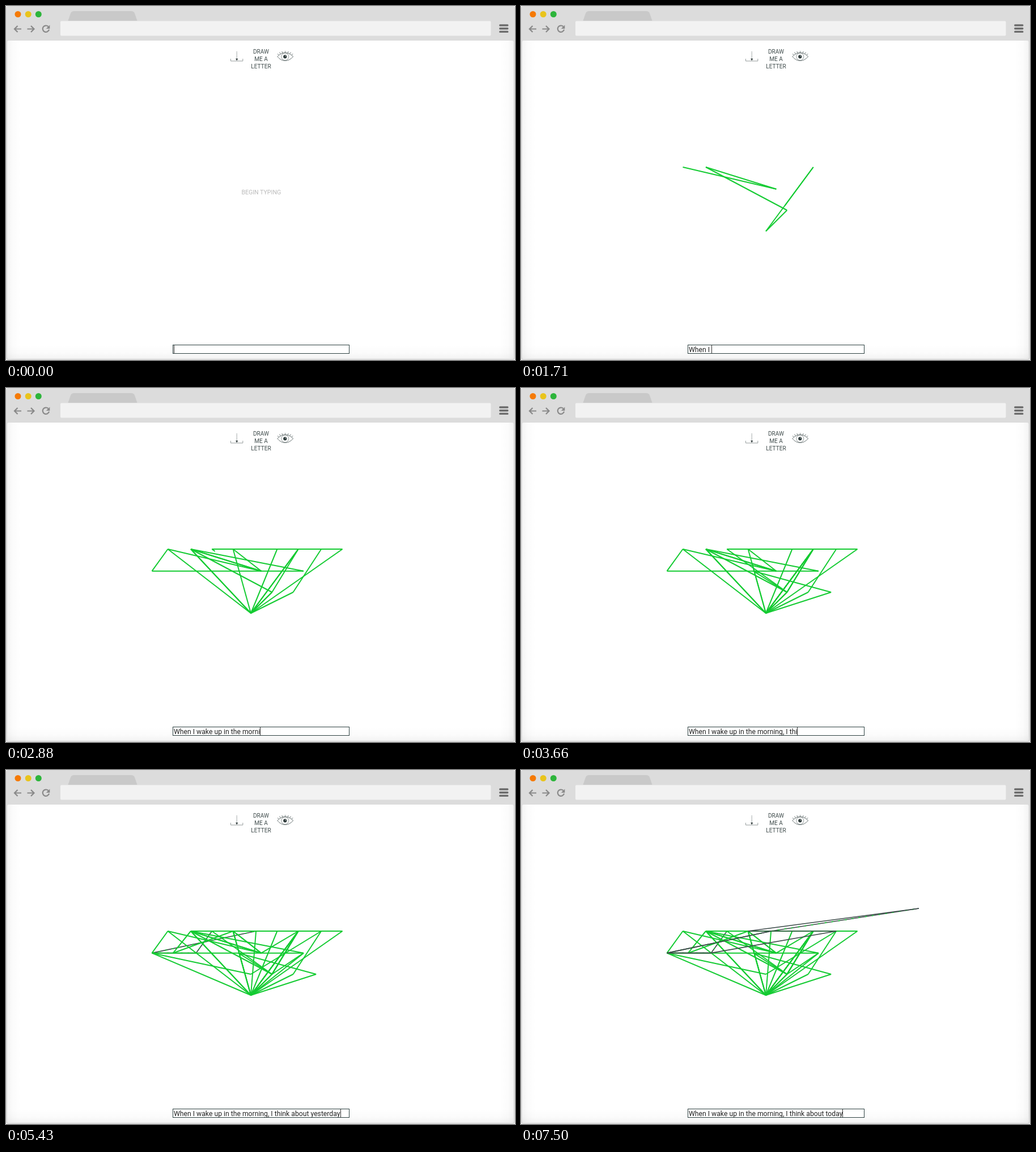
An HTML page with a canvas for the animation above (7.71 s loop, 898 by 624 pixels).

```html
<!DOCTYPE html>
<html lang="en">
<head>
<meta charset="utf-8">
<title>Draw me a letter</title>
<style>
  html, body { margin: 0; width: 100%; height: 100%; overflow: hidden; background: #fff; }
  svg, canvas { position: absolute; left: 0; top: 0; }
  text { font-family: Roboto, sans-serif; text-anchor: middle; }
  .title { font-size: 10.1px; fill: #414d4d; }
  .hint { font-size: 10.6px; fill: #bababa; animation: vanish 7710ms linear infinite; }
  @keyframes vanish { 0%, .4% { opacity: 1; } 3.5%, 100% { opacity: 0; } }
  .field {
    position: absolute; left: 294px; top: 597px; width: 310px; height: 14px;
    border: 1px solid #2e4141; background: #fff; overflow: hidden;
    font: 12.2px/16px Roboto, sans-serif; color: #222; white-space: pre;
  }
  .typed { position: absolute; left: 1px; top: 0; display: flex; height: 14px; }
  #caret { width: 1px; background: #333; }
</style>
</head>
<body>
<svg width="898" height="624" viewBox="0 0 898 624">
  <defs>
    <linearGradient id="side">
      <stop offset="0" stop-opacity=".045"/>
      <stop offset=".4" stop-opacity=".015"/>
      <stop offset="1" stop-opacity="0"/>
    </linearGradient>
    <linearGradient id="foot" href="#side" x1="0" y1="1" x2="0" y2="0"/>
  </defs>

  <!-- browser window -->
  <rect width="898" height="624" rx="4" fill="#dcdcdc"/>
  <rect x="2" y="61" width="893.5" height="560.5" rx="2" fill="#fff"/>
  <rect x="2" y="61" width="24" height="560" fill="url(#side)"/>
  <rect x="2" y="61" width="24" height="560" fill="url(#side)" transform="matrix(-1 0 0 1 897.5 0)"/>
  <rect x="2" y="597" width="893" height="24" fill="url(#foot)"/>
  <circle cx="21" cy="14.5" r="5.5" fill="#f57a05"/>
  <circle cx="39.2" cy="14.5" r="5.5" fill="#e9c41c"/>
  <circle cx="57.3" cy="14.5" r="5.5" fill="#2db53b"/>
  <path d="M109.500 26L114 13Q115.500 9 120 9H221Q225.500 9 227 13L231.500 26Z" fill="#c9c9c9"/>
  <rect x="96" y="26.500" width="759.500" height="26" rx="2" fill="#f2f2f2"/>
  <g fill="none" stroke="#898989" stroke-width="2.2">
    <path d="M27 40.500H15.500M20.500 35L15 40.500L20.500 46"/>
    <path d="M37.500 40.500H49M44 35L49.500 40.500L44 46"/>
    <path d="M74.500 36.200A5.700 5.700 0 1 0 76 41.500"/>
  </g>
  <path d="M77.300 33.500V40H70.800Z" fill="#898989"/>
  <path d="M871.700 34H884.800M871.700 39.700H884.800M871.700 45.400H884.800" stroke="#6c6c6c" stroke-width="3.4" stroke-linecap="round"/>

  <!-- page header -->
  <g class="title">
    <text x="450" y="84.300">DRAW</text>
    <text x="450" y="97.300">ME A</text>
    <text x="450" y="110.300">LETTER</text>
  </g>
  <g fill="none" stroke="#4a5656" stroke-width=".8">
    <path d="M396.500 93V97H417.800V93" stroke="#7b8484"/>
    <path d="M407.200 80.500V93" stroke-dasharray="1.6 1"/>
    <path d="M405.600 93H408.800L407.200 96Z" fill="#222"/>
    <path d="M478.800 89.200Q485 82.500 492.500 82.500T506.700 89.200Q500 96.500 492.500 96.500T478.800 89.200Z"/>
    <circle cx="492.300" cy="89.300" r="6.500" stroke-width=".6"/>
    <path d="M481.500 86.500L479 84.300M484.500 84.500L482.500 81.500M488 83L486.800 80M492.500 82.500V79.300M497 83L498.200 80M500.500 84.500L502.500 81.500M503.800 86.500L506.300 84.300"/>
    <circle cx="492.300" cy="89.300" r="2.900" fill="#2c3838"/>
  </g>
  <circle cx="493.200" cy="88.300" r=".7" fill="#fff"/>
  <text class="hint" x="450.300" y="332">BEGIN TYPING</text>
</svg>
<canvas id="art" width="898" height="624"></canvas>
<div class="field"><div class="typed"><span id="words"></span><span id="caret"></span></div></div>

<script>
const LOOP = 7710, PEN_DELAY = 85, GREEN = '#14cb32', DARK = '#3c4a49';
const words = document.getElementById('words'), caret = document.getElementById('caret');
const ctx = document.getElementById('art').getContext('2d');

// text, start and ms per key; '<' is backspace
const bursts = [
  ['W', 30, 0],
  ['hen I ', 450, 210],
  ['wake up in the morning', 1740, 58.5],
  [', I think about ye', 3270, 64],
  ['sterday', 4650, 85],
  ['<'.repeat(9), 5640, 60],
  ['to', 6420, 120],
  ['day', 6900, 60],
];

// keyboard rows: keys, first x, y, and where the wider gap after every third key falls
const spot = { ' ': [432, 397], '<': [702, 244] };
for (const [row, x, y, shift] of [['qwertyuiop', 248.2, 284, 1], ['asdfghjkl', 257.5, 322.7, 1], ['zxcvbnm,', 276.4, 360, 2]])
  [...row].forEach((c, i) => spot[c] = [x + 37.3 * i + 3.2 * Math.floor((i + shift) / 3), y]);

const keys = bursts.flatMap(([text, start, pace]) =>
  [...text].map((char, i) => ({ char, pace, time: start + pace * i, at: spot[char.toLowerCase()] })));

// strokes turn dark late in the text: mixed from the "d" of "yesterday", solid once rewriting starts
const mixedFrom = keys.findIndex(k => k.char === '<') - 3;
const solidFrom = keys.findLastIndex(k => k.char === '<') + 1;

function line([x0, y0], [x1, y1], part, color, width, dash = []) {
  ctx.strokeStyle = color;
  ctx.lineWidth = width;
  ctx.setLineDash(dash);
  ctx.beginPath();
  ctx.moveTo(x0, y0);
  ctx.lineTo(x0 + (x1 - x0) * part, y0 + (y1 - y0) * part);
  ctx.stroke();
}

function drawArt(t) {
  ctx.clearRect(0, 0, 898, 624);
  for (let i = 1; i < keys.length; i++) {
    const key = keys[i], from = keys[i - 1].at;
    const part = Math.min(1, (t - key.time - PEN_DELAY) / key.pace);
    if (part <= 0) break;
    if (from === key.at) continue;
    const mixed = i >= mixedFrom && i < solidFrom;
    // mixed strokes lie below the green ones
    ctx.globalCompositeOperation = mixed ? 'destination-over' : 'source-over';
    if (mixed) line(from, key.at, part, GREEN, 1.8, [3, 9]);
    if (i >= mixedFrom) line(from, key.at, part, DARK, 1.7);
    else line(from, key.at, part, GREEN, 2);
  }
}

function drawText(t) {
  const pressed = keys.filter(k => k.time <= t);
  words.textContent = pressed.reduce((s, k) => k.char === '<' ? s.slice(0, -1) : s + k.char, '');
  const idle = pressed.length ? t - pressed[pressed.length - 1].time : 0;
  caret.style.visibility = idle > 300 && idle < 460 ? 'hidden' : 'visible';
}

const hint = document.querySelector('.hint').getAnimations()[0];
hint.pause();

function frame(now) {
  const t = now % LOOP;
  hint.currentTime = t;
  drawText(t);
  drawArt(t);
  requestAnimationFrame(frame);
}
frame(performance.now());
</script>
</body>
</html>
```
